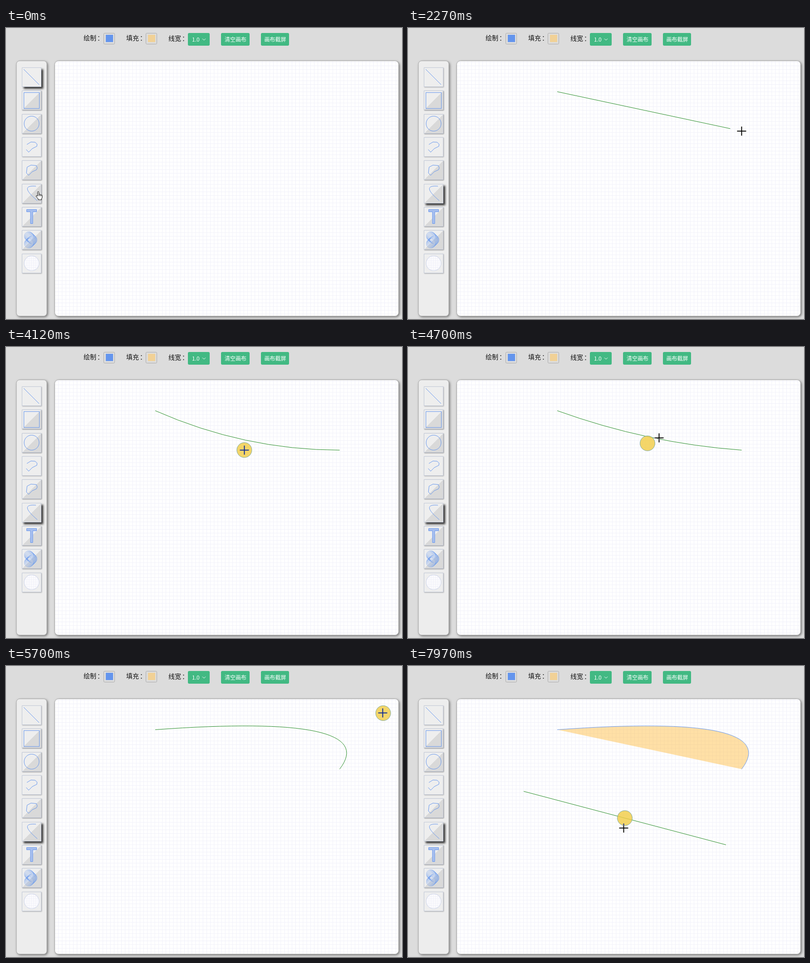
Recreate the animation shown at these times as an HTML page. Size 873 by 642 pixels, loop 8 s.

```html
<!DOCTYPE html>
<html lang="zh-CN">
<head>
<meta charset="utf-8">
<style>
html, body { margin: 0; width: 100%; height: 100%; overflow: hidden; background: #dcdcdc; }
svg { display: block; }
text { font: 14px "Noto Sans CJK SC", "Noto Sans CJK", sans-serif; fill: #111; }
.small { font-size: 12px; fill: #fff; }
.green { fill: #42b983; }
.panel { stroke: #a9a9a9; filter: drop-shadow(2px 2px 2.5px #777); }
.tool { stroke: #c3cad9; fill: url(#split); filter: drop-shadow(1.5px 1.5px 1px #888); }
.plain { fill: #eee; filter: drop-shadow(1px 1px 1px #aaa); }
.active { filter: drop-shadow(4px 4px 2px #333); }
.icon { fill: none; stroke: #6495ed; }
.guide { fill: none; stroke: #228b22; }
.done { fill: rgba(255, 165, 0, .35); stroke: #6495ed; }
#handle { fill: rgba(242, 205, 72, .82); stroke: #7aa7a0; }
#cross { fill: none; stroke: #fff; stroke-width: 2; mix-blend-mode: difference; }
</style>
</head>
<body>
<svg width="873" height="642" viewBox="0 0 873 642">
  <defs>
    <linearGradient id="split" x2="1" y2="1">
      <stop offset=".5" stop-color="#eee"/><stop offset=".5" stop-color="#d9d9d9"/>
    </linearGradient>
    <pattern id="grid" x="107" y="75" width="8.17" height="8.17" patternUnits="userSpaceOnUse">
      <path d="M0 .5H9M.5 0V9" stroke="#f0f0f9"/>
    </pattern>
    <pattern id="fine" width="4" height="4" patternUnits="userSpaceOnUse">
      <path d="M0 .5H4M.5 0V4" stroke="#eeeef8"/>
    </pattern>
  </defs>
  <rect width="873" height="642" fill="#dcdcdc"/>

  <text x="171" y="27">绘制<tspan dx="2">：</tspan></text>
  <text x="265" y="27">填充<tspan dx="2">：</tspan></text>
  <text x="358" y="28">线宽<tspan dx="2">：</tspan></text>
  <g fill="none" stroke="#aaa">
    <rect x="215.5" y="11.5" width="24" height="24" rx="2"/>
    <rect x="308.5" y="11.5" width="24" height="24" rx="2"/>
  </g>
  <rect x="220" y="15" width="16" height="16" fill="#6495ed"/>
  <rect x="313" y="15" width="16" height="16" fill="#f1d196"/>
  <rect class="green" x="401" y="11" width="48" height="28" rx="3"/>
  <rect class="green" x="474" y="11" width="63" height="28" rx="3"/>
  <rect class="green" x="562" y="11" width="62" height="28" rx="3"/>
  <text class="small" x="410" y="30">1.0</text>
  <path d="M433 23.5l3.5 3.5 3.5-3.5" fill="none" stroke="#fff"/>
  <text class="small" x="482" y="30">清空画布</text>
  <text class="small" x="569.5" y="30">画布截屏</text>

  <rect class="panel" x="23" y="72.5" width="67" height="563" rx="7" fill="#ededed"/>
  <rect class="panel" x="107.5" y="72.5" width="758" height="563" rx="8" fill="#fff"/>
  <rect x="108" y="73" width="757" height="562" rx="8" fill="url(#grid)"/>
  <g id="tools"></g>

  <path id="curve1"/>
  <path id="curve2" class="guide"/>
  <circle id="handle" r="16.5"/>
  <path id="cross" d="M-10.5-.5H9.5M-.5-10.5V9.5"/>
  <g id="hand" stroke="#000" fill="#fff">
    <path d="M-1.5 10V1.5a1.5 1.5 0 0 1 3 0V6q1.5-1 2.8.5 1.5-.6 2.5.7 1.7-.2 2 1.3V12q0 2-1.5 3.5V18H0V16L-4.6 10.5q-.2-2 1.6-1.6z"/>
    <path d="M1.5 6v4M4.3 7v3M6.8 8v2"/>
  </g>
</svg>
<script>
const $ = id => document.getElementById(id);

// Rings along a "V" lying on its side.
let rings = '';
for (let u = -1; u <= 1.01; u += .2)
  rings += `<circle cx="${58.5 - 8 * Math.abs(u)}" cy="${467.5 + 8 * u}" r="10" stroke-width=".6"/>`;

const icons = [
  '<path d="M39 91L73 125"/>',
  '<rect x="39.5" y="142.5" width="34" height="35"/>',
  '<circle cx="56.5" cy="211" r="16.5"/>',
  '<path d="M46 257L55 251.5 64 252 68.5 256 68 261 58 266 50 274 44.5 268"/>',
  '<path d="M46.5 307L55 302.5 67 303.5 69 309 67 313 58 317 50 325 45 320z"/>',
  '<path d="M66 349C40 347 41 357 69 381"/>',
  '<path d="M45.5 400.5h22v5H59v26h-5v-26h-8.500z" fill="#a9c0ee"/>',
  rings,
  '<g stroke="#d3d9ea"><circle cx="56.5" cy="519" r="16.5" fill="#fff"/><circle cx="56.5" cy="519" r="16.5" fill="url(#fine)"/></g>'
];
const plain = [0, 3, 8];
$('tools').innerHTML = icons.map((icon, i) =>
  `<rect class="tool ${plain.includes(i) ? 'plain' : ''}" x="35.5" y="${Math.round(87 + 51.35 * i) + .5}" width="42" height="42"/>
   <g class="icon">${icon}</g>`).join('');
const tools = document.querySelectorAll('.tool');

// The screen refreshes in even steps, counted from the click on the curve tool.
const LOOP = 8000, CLICK = 770, STEP = 140;
const stepAt = t => Math.floor((t - CLICK) / STEP + .22);

const linear = p => p, easeIn = p => p ** 1.6, easeOut = p => 1 - (1 - p) ** 2;
const middle = (a, b) => [(a[0] + b[0]) / 2, (a[1] + b[1]) / 2];

// A move runs between two steps to a point, optionally bowed towards a control point.
const drag1 = { from: 6, until: 10, to: [735.5, 227.5], ease: easeOut };
const drag2 = { from: 43, until: 48, to: [701, 394.5], ease: easeIn };
const cursorStart = [71, 361];
const cursorMoves = [
  { from: -6, until: -5, to: [72, 361] },
  { from: 0, until: 6, to: [336, 140] },
  drag1,
  { from: 10, until: 15, to: [525, 204], bow: [690, 295] },
  { from: 15, until: 17, to: [533, 183] },
  { from: 22, until: 25, to: [522, 250] },
  { from: 27, until: 28, to: [554, 201] },
  { from: 28, until: 35, to: [831, 104] },
  { from: 37, until: 43, to: [255, 277], bow: [560, 640] },
  drag2,
  { from: 48, until: 51, to: [476, 358] }
];
const line1 = [329, 140.5], line2 = [255, 276.5];
const bendMoves = [
  { from: 22, until: 25, to: [522, 249] },
  { from: 27, until: 28, to: [528, 212.5] },
  { from: 28, until: 35, to: [831.5, 104] }
];

function follow(start, moves, n) {
  let point = start;
  for (const { from, until, to, bow = middle(point, to), ease = linear } of moves) {
    if (n <= from) break;
    const p = ease(Math.min(1, (n - from) / (until - from))), q = 1 - p;
    point = point.map((v, i) => q * q * v + 2 * p * q * bow[i] + p * p * to[i]);
  }
  return point;
}
const cursorAt = n => follow(cursorStart, cursorMoves, n);

// A dragged line end trails the cursor by one step.
const dragEnd = (drag, n) => cursorAt(Math.max(drag.from, Math.min(drag.until, n - 1)));

const show = (el, on) => el.setAttribute('visibility', on ? 'visible' : 'hidden');
const place = (el, p) => el.setAttribute('transform', `translate(${p})`);
const drawCurve = (el, a, control, b) => el.setAttribute('d', `M${a}Q${control} ${b}`);

function render(t) {
  const n = stepAt(t % LOOP);
  tools[0].classList.toggle('active', n < 0);
  tools[5].classList.toggle('active', n >= 0);

  const end1 = dragEnd(drag1, n), end2 = dragEnd(drag2, n);
  const control1 = follow(middle(line1, end1), bendMoves, n);
  const control2 = middle(line2, end2);
  const finished = n >= 38;
  drawCurve($('curve1'), line1, control1, end1);
  drawCurve($('curve2'), line2, control2, end2);
  $('curve1').setAttribute('class', finished ? 'done' : 'guide');
  show($('curve1'), n > drag1.from);
  show($('curve2'), n > drag2.from);

  place($('handle'), finished ? control2 : control1);
  show($('handle'), finished ? n > drag2.until : n > drag1.until + 1);

  const pointing = n <= 0 || n > 15 && n < 23;
  const cursor = cursorAt(n).map(Math.round);
  place($('hand'), cursor);
  place($('cross'), cursor);
  show($('hand'), pointing);
  show($('cross'), !pointing);
}

const began = performance.now();
function tick() {
  render(performance.now() - began);
  requestAnimationFrame(tick);
}
tick();
</script>
</body>
</html>
```
